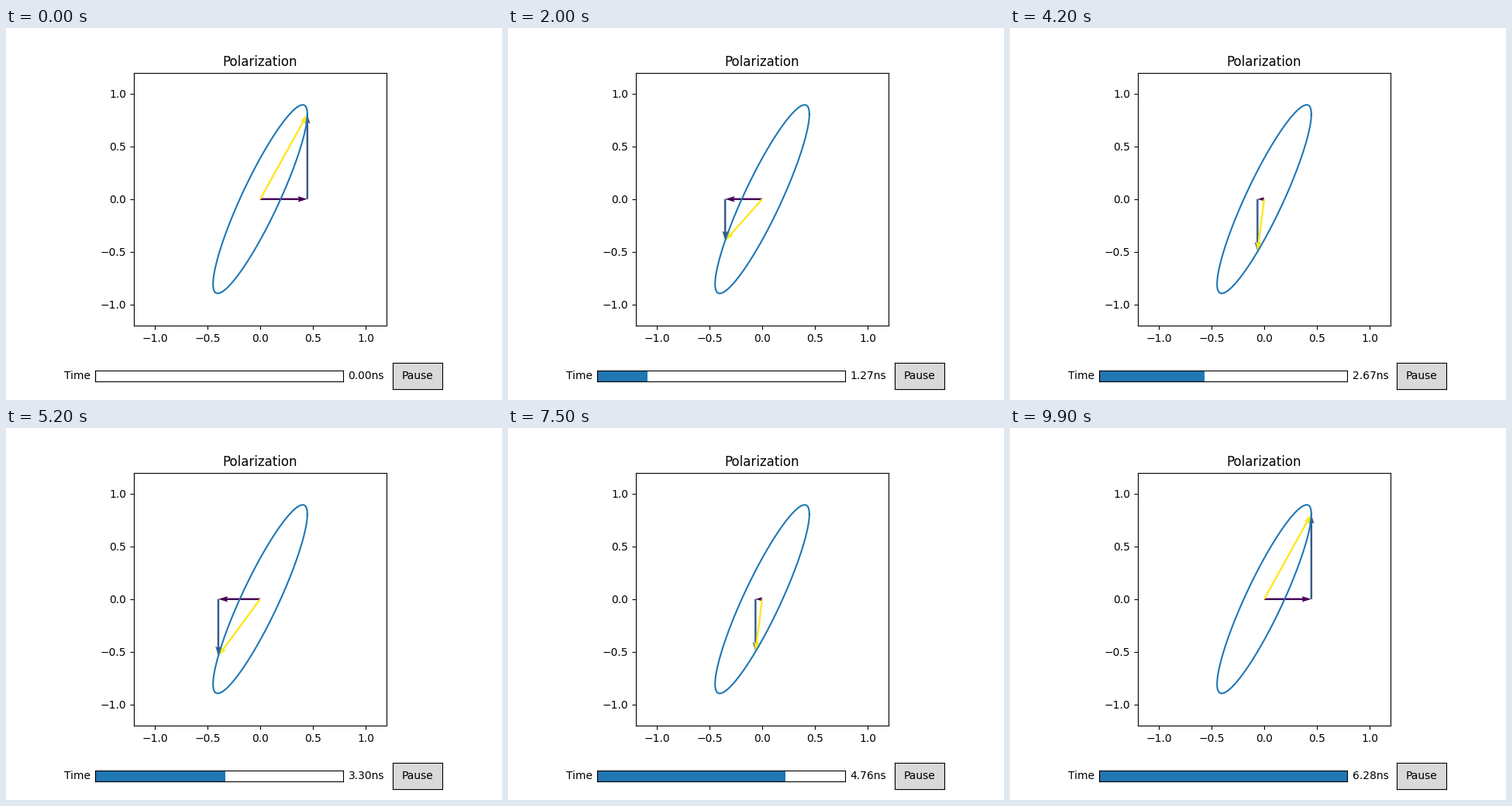
These frames come from a looping animation (640 by 480 pixels, 10000 ms). A matplotlib script:

```python
import numpy as np
import matplotlib.pyplot as plt
from matplotlib.animation import FuncAnimation

FRAMES = 100
T_MAX = 2 * np.pi
OMEGA = 3
PHASE = np.pi / 7
AX, AY = np.array([1, 2]) / np.sqrt(5)


def field(angle):
    return AX * np.cos(angle), AY * np.cos(angle + PHASE)


def widget_axes(rect, color):
    box = fig.add_axes(rect, facecolor=color)
    box.set(xticks=[], yticks=[], xlim=(0, 1), ylim=(0, 1))
    return box


fig, ax = plt.subplots(figsize=(6.4, 4.8), dpi=100)
fig.subplots_adjust(left=0.125, right=0.9, bottom=0.2, top=0.88)
ax.set(title="Polarization", xlim=(-1.2, 1.2), ylim=(-1.2, 1.2), aspect="equal")

ax.plot(*field(np.linspace(0, 2 * np.pi, 200)))

# x component, y component and their sum
x0, y0 = field(0)
arrows = ax.quiver([0, x0, 0], [0, 0, 0], [x0, 0, x0], [0, y0, y0],
                   color=plt.cm.viridis([0.0, 0.28, 1.0]),
                   angles="xy", scale_units="xy", scale=1)

slider = widget_axes([0.18, 0.05, 0.5, 0.03], "white")
bar = plt.Rectangle((0, 0), 0, 1, facecolor="C0", linewidth=0)
slider.add_patch(bar)
slider.axvline(0, color="r", lw=1)
slider.text(-0.02, 0.5, "Time", ha="right", va="center")
readout = slider.text(1.02, 0.5, "", ha="left", va="center")

button = widget_axes([0.78, 0.03, 0.1, 0.07], "0.85")
button.text(0.5, 0.5, "Pause", ha="center", va="center")


def update(i):
    t = T_MAX * i / (FRAMES - 1)
    x, y = field(OMEGA * t)
    arrows.set_offsets([[0, 0], [x, 0], [0, 0]])
    arrows.set_UVC([x, 0, x], [0, y, y])
    bar.set_width(t / T_MAX)
    readout.set_text(f"{t:.2f}ns")
    return arrows, bar, readout


anim = FuncAnimation(fig, update, frames=FRAMES, interval=100,
                     repeat=True, repeat_delay=0)
plt.show()
```
